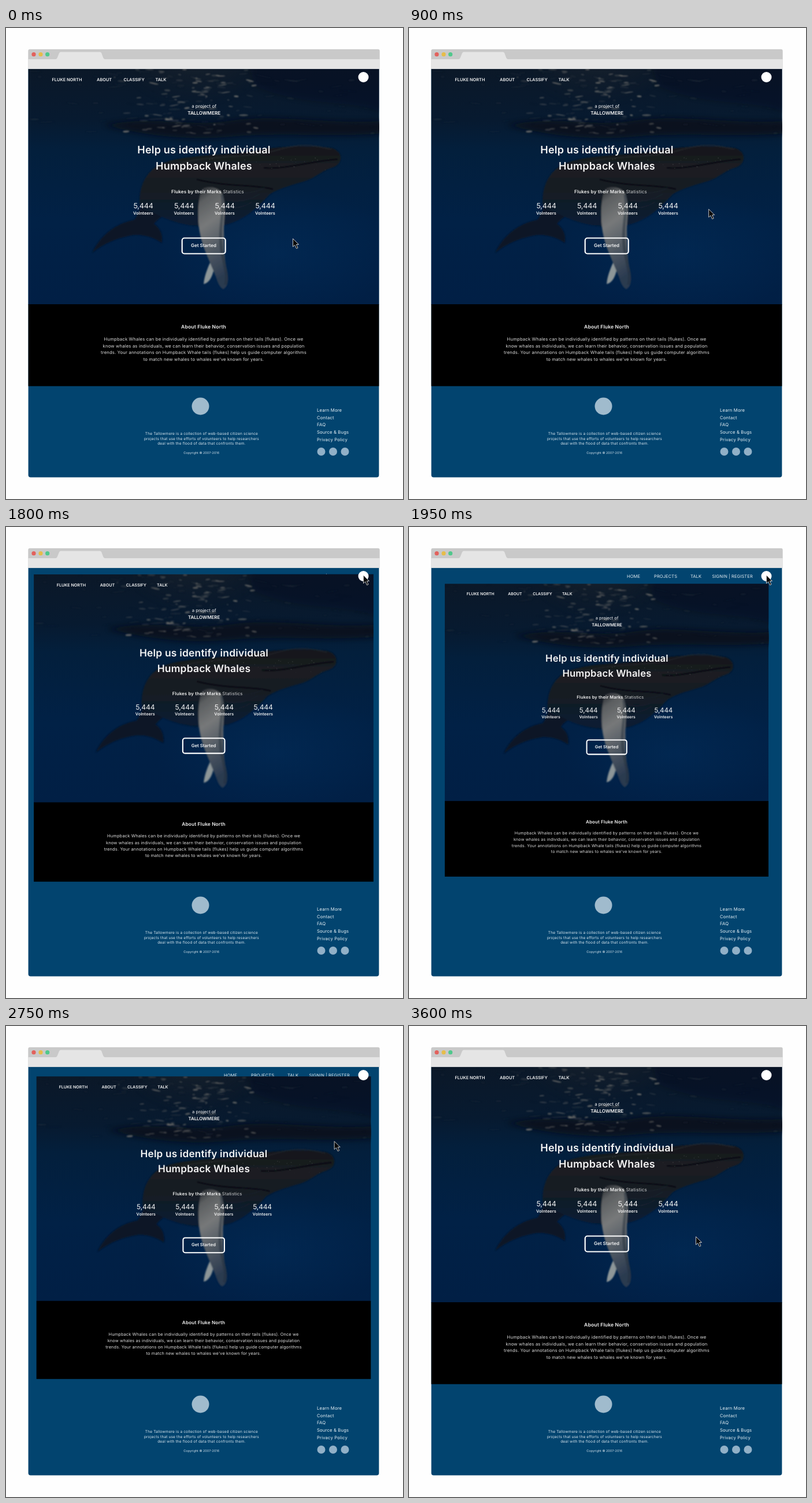
Write an HTML page that moves like this. It is 687x815 px and loops after 3650 ms.

```html
<!DOCTYPE html>
<html lang="en">
<head>
<meta charset="utf-8">
<title>Whale landing page</title>
<style>
  html, body { margin: 0; width: 100%; height: 100%; overflow: hidden; background: #fefefe; }
  svg { display: block; width: 687px; height: 815px; }
  text { font-family: Inter, "Open Sans", sans-serif; fill: #f4f4f4; text-rendering: geometricPrecision; white-space: pre; }
  .mid { text-anchor: middle; }
  .bold { font-weight: 600; }
  .nav { font-size: 7.4px; }
  .menu { font-size: 7.5px; letter-spacing: .12px; fill: #e6edf2; }
  .small { font-size: 8px; }
  .brand { font-size: 8.2px; }
  .head { font-size: 18px; letter-spacing: .2px; }
  .sub { font-size: 8px; letter-spacing: .2px; }
  .num { font-size: 12.6px; letter-spacing: -.2px; }
  .unit { font-size: 7.4px; letter-spacing: .1px; }
  .title { font-size: 8.6px; letter-spacing: .15px; }
  .body { font-size: 7.7px; letter-spacing: .16px; fill: #dcdcdc; }
  .foot { font-size: 6.5px; letter-spacing: .17px; fill: #dbe6ee; }
  .copy { font-size: 5.5px; fill: #d0dde7; }
  .link { font-size: 7.7px; letter-spacing: .15px; fill: #e8f0f5; }
</style>
</head>
<body>
<svg viewBox="0 0 687 815">
  <defs>
    <linearGradient id="sea" x2="0" y2="1">
      <stop offset="0" stop-color="#0b1828"/>
      <stop offset=".22" stop-color="#071a30"/>
      <stop offset=".34" stop-color="#031f3c"/>
      <stop offset=".65" stop-color="#012146"/>
      <stop offset="1" stop-color="#011f45"/>
    </linearGradient>
    <radialGradient id="sun" cx=".5" cy="0" r=".8">
      <stop offset="0" stop-color="#4b4a46" stop-opacity=".7"/>
      <stop offset="1" stop-color="#1b232c" stop-opacity="0"/>
    </radialGradient>
    <radialGradient id="glow">
      <stop offset="0" stop-color="#02305f" stop-opacity=".45"/>
      <stop offset="1" stop-color="#02305f" stop-opacity="0"/>
    </radialGradient>
    <linearGradient id="skin" x2="0" y2="1">
      <stop offset="0" stop-color="#14171c"/>
      <stop offset=".3" stop-color="#1c1e22"/>
      <stop offset=".6" stop-color="#141b25"/>
      <stop offset="1" stop-color="#061b35"/>
    </linearGradient>
    <linearGradient id="fin" x2=".2" y2="1">
      <stop offset="0" stop-color="#1f2329"/>
      <stop offset=".16" stop-color="#5c5f61"/>
      <stop offset=".4" stop-color="#77797a"/>
      <stop offset=".7" stop-color="#4f5862"/>
      <stop offset="1" stop-color="#2a3a50"/>
    </linearGradient>
    <filter id="soft" x="-10%" y="-10%" width="120%" height="120%"><feGaussianBlur stdDeviation=".9"/></filter>
    <filter id="haze" x="-20%" y="-20%" width="140%" height="140%"><feGaussianBlur stdDeviation="5"/></filter>
    <clipPath id="hero"><rect x="38.6" y="70.800" width="606.800" height="408"/></clipPath>
  </defs>

  <path d="M38.600 70H645.400V773.500q0 4-4 4H42.600q-4 0-4-4Z" fill="#02446f"/>
  <g id="menu"></g>
  <g id="footer">
    <circle cx="336.5" cy="654.5" r="15" fill="#a0bbcd"/>
    <g fill="#91b0c7">
      <circle cx="545.5" cy="733" r="7"/><circle cx="566" cy="733" r="7"/><circle cx="586.5" cy="733" r="7"/>
    </g>
  </g>

  <g id="page">
    <g clip-path="url(#hero)">
      <rect x="38" y="70" width="608" height="409" fill="url(#sea)"/>
      <ellipse cx="470" cy="390" rx="210" ry="110" fill="url(#glow)"/>
      <g filter="url(#haze)" fill="#080e18" opacity=".7">
        <path d="M170 168C260 150 310 172 390 160S560 168 660 160V182C560 190 470 180 390 188S230 184 170 168Z"/>
        <path d="M420 60H660V150C600 120 520 140 430 100Z" opacity=".35"/>
      </g>
      <ellipse cx="325" cy="71" rx="110" ry="115" fill="url(#sun)"/>
      <g id="glints" filter="url(#soft)"></g>
      <g filter="url(#soft)">
        <path d="M240 292C232 312 228 325 222 332C190 338 164 358 149 389C170 372 195 362 222 358C242 357 258 364 270 372C272 358 267 346 256 339C262 330 275 322 286 318Z" fill="#0b1727"/>
        <path d="M231 302C231 272 242 250 266 236C310 217 378 222 432 212C475 204 525 203 558 207C571 208 580 216 579 226C578 236 570 240 560 243C546 248 536 258 520 264C498 271 474 276 456 288C440 306 414 333 378 341C335 350 290 338 260 322C245 315 232 316 231 302Z" fill="url(#skin)"/>
        <path d="M446 242C484 245 530 230 574 227M330 262C385 276 430 270 462 279" fill="none" stroke="#0a0f17" stroke-width="3"/>
        <path d="M300 234C360 219 420 226 470 211S540 206 563 210" fill="none" stroke="#2c2e31" stroke-width="2" opacity=".6"/>
        <g fill="none" stroke="#3c4248" opacity=".35">
          <path d="M384 285Q420 290 448 277M382 298Q412 304 440 287M380 311Q406 314 426 301"/>
        </g>
        <path d="M357 398C351 410 343 428 342 443C349 442 356 434 359 420Z" fill="#8d9698"/>
        <path d="M338 280C332 300 331 328 335 352C339 378 352 402 363 430C367 443 371 450 376 452C385 447 386 434 382 417C377 397 378 374 377 350C377 325 382 302 373 284C364 275 348 272 338 280Z" fill="url(#fin)"/>
        <path d="M374 288C379 320 366 350 374 390S383 424 380 444" fill="none" stroke="#25313d" stroke-width="5" opacity=".5"/>
      </g>
      <g id="specks" fill="#777a78" opacity=".25"></g>
    </g>
    <rect x="38.600" y="478" width="606.800" height="141.700"/>
    <rect x="304.7" y="363.5" width="75" height="27" rx="4" fill="none" stroke="#fff" stroke-width="2.2"/>
    <g id="copy"></g>
  </g>

  <path d="M38.300 70.800V40q0-3.300 3-3.300H643.700q3 0 3 3.300V70.800Z" fill="#c9c9c9"/>
  <path d="M38.300 54H86Q88 54 89 51L92 43.500Q92.800 41.500 95 41.500H162Q164.500 41.500 165.300 43.500L168 51Q169 54 171 54H646.700V70.800H38.300Z" fill="#e5e5e5"/>
  <circle cx="48" cy="45.700" r="3.600" fill="#e2625d"/>
  <circle cx="60" cy="45.700" r="3.600" fill="#e6bd4a"/>
  <circle cx="71.700" cy="45.700" r="3.600" fill="#50c88c"/>
  <circle cx="618.500" cy="85" r="9" fill="#fff"/>
  <path id="cursor" d="M0 0V14L3.300 11L6 17L8.500 16L6 10H10Z" fill="#070707" stroke="#d8d8d8" stroke-width=".9"/>
</svg>
<script>
const $ = id => document.getElementById(id);
const NS = "http://www.w3.org/2000/svg";

function add(parent, tag, attrs, text) {
  const el = document.createElementNS(NS, tag);
  for (const key in attrs) el.setAttribute(key, attrs[key]);
  if (text) el.textContent = text;
  parent.append(el);
  return el;
}
const label = (parent, cls, x, y, text) => add(parent, "text", { class: cls, x, y }, text);
const lines = (parent, cls, x, y, step, list) =>
  list.forEach((text, i) => label(parent, cls, x, y + i * step, text));

const menu = $("menu"), footer = $("footer"), copy = $("copy");

[["HOME", 377], ["PROJECTS", 424], ["TALK", 487], ["SIGNIN | REGISTER", 524.5]]
  .forEach(([text, x]) => label(menu, "menu", x, 87.5, text));

[["FLUKE NORTH", 79.5], ["ABOUT", 157], ["CLASSIFY", 203.5], ["TALK", 258.5]]
  .forEach(([text, x]) => label(copy, "nav bold", x, 92.2, text));

label(copy, "small mid", 342.7, 137.5, "a project of");
label(copy, "brand mid bold", 342.7, 150.2, "TALLOWMERE");
lines(copy, "head mid bold", 342.5, 217, 28, ["Help us identify individual", "Humpback Whales"]);
const sub = label(copy, "sub", 286, 286.3, "");
add(sub, "tspan", { class: "bold" }, "Flukes by their Marks");
add(sub, "tspan", { opacity: .85 }, " Statistics");
[237.5, 308, 378.5, 448.5].forEach(x => {
  label(copy, "num mid", x, 312, "5,444");
  label(copy, "unit mid bold", x, 322.7, "Volnteers");
});
label(copy, "small mid bold", 342, 379.2, "Get Started");
label(copy, "title mid bold", 342, 520.3, "About Fluke North");
lines(copy, "body mid", 342, 541, 11.5, [
  "Humpback Whales can be individually identified by patterns on their tails (flukes). Once we",
  "know whales as individuals, we can learn their behavior, conservation issues and population",
  "trends. Your annotations on Humpback Whale tails (flukes) help us guide computer algorithms",
  "to match new whales to whales we've known for years."
]);

lines(footer, "foot mid", 338.4, 704.3, 8.2, [
  "The Tallowmere is a collection of web-based citizen science",
  "projects that use the efforts of volunteers to help researchers",
  "deal with the flood of data that confronts them."
]);
label(footer, "copy mid", 338.2, 736.8, "Copyright © 2007-2016");
lines(footer, "link", 538, 664, 12.7, ["Learn More", "Contact", "FAQ", "Source & Bugs", "Privacy Policy"]);

// Light on the water surface and pale marks on the skin
let seed = 11;
const rnd = () => (seed = seed * 16807 % 2147483647) / 2147483647;
for (let i = 0; i < 210; i++) {
  const lit = i < 130;
  const y = 72 + rnd() * 110;
  const x = lit ? 325 + (rnd() + rnd() + rnd() - 1.5) * 110 : 45 + rnd() * 595;
  add($("glints"), "ellipse", {
    cx: x, cy: y, rx: 1.5 + rnd() * (lit ? 7 : 14), ry: .5 + rnd() * 1.2,
    fill: lit ? "#8c877e" : "#343d47", opacity: (lit ? .75 : .4) * rnd(),
    transform: `rotate(${rnd() * 24 - 10} ${x} ${y})`
  });
}
for (let i = 0; i < 40; i++) {
  const x = 350 + rnd() * 215;
  add($("specks"), "circle", { cx: x, cy: 224 + rnd() * 22, r: .3 + rnd() * .7 });
}

const LOOP = 3650, REST = .921, CX = 342, CY = 428;
const ease = (t, from, to) => {
  const p = Math.min(1, Math.max(0, (t - from) / (to - from)));
  return (1 - Math.cos(Math.PI * p)) / 2;
};

function draw(t) {
  const back = ease(t, 2480, 3090);
  const scale = 1 - (1 - REST) * (ease(t, 1660, 1985) - back);
  $("page").setAttribute("transform", `translate(${CX} ${CY}) scale(${scale}) translate(${-CX} ${-CY})`);
  const go = ease(t, 730, 1340) - back;
  $("cursor").setAttribute("transform", `translate(${496.5 + 122 * go} ${364.5 - 281 * go})`);
}

const start = performance.now();
function tick() {
  draw((performance.now() - start) % LOOP);
  requestAnimationFrame(tick);
}
draw(0);
requestAnimationFrame(tick);
</script>
</body>
</html>
```
